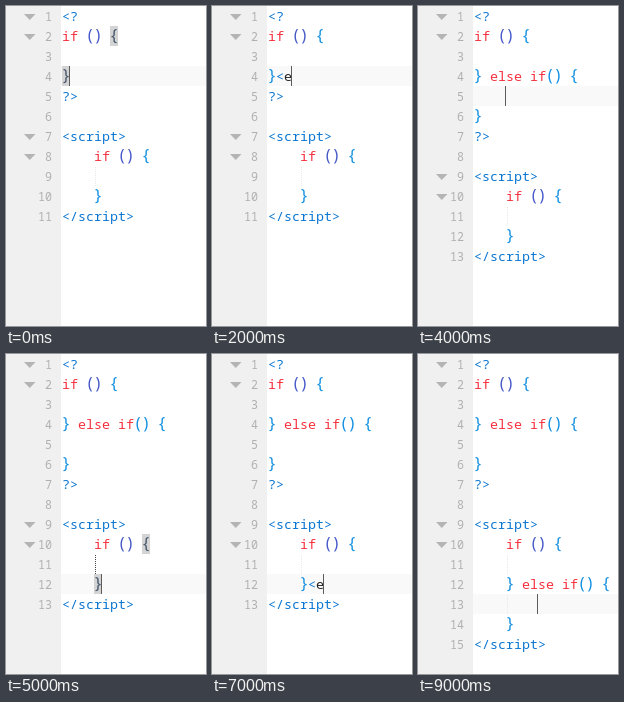
Animation, 200 px wide and 320 px high, one loop 10000 ms. Source, as an HTML page:

```html
<!DOCTYPE html>
<html lang="en">
<head>
<meta charset="utf-8">
<title>Code editor</title>
<style>
  html, body { margin: 0; width: 100%; height: 100%; overflow: hidden; background: #fff; }
  svg { display: block; width: 200px; height: 320px; }
  text { white-space: pre; font: 500 13.3333px "Noto Sans Mono", monospace; }
  .number { font-size: 11.7px; font-weight: 400; fill: #b0b0b0; text-anchor: end; }
  .fold { fill: #b4b4b4; }
  .bracket { font-size: 16px; font-weight: 400; text-anchor: middle; }
  .tag { fill: #0b76d1; }
  .keyword { fill: #f5303d; }
  .paren { fill: #4558c8; }
  .call, .brace { fill: #108fe0; }
  .plain { fill: #222; }
  .matchBrace { fill: #44566b; }
  .matchParen { fill: #7b4c43; }
</style>
</head>
<body>
<svg id="stage" viewBox="0 0 200 320"></svg>
<script>
const STEP = 1000, LEFT = 56, CHAR = 8, ROW = 20, BASELINE = 15;
const stage = document.getElementById("stage");
const TOKENS = /<\/?\w+>|<\?|\?>|<|else|if|[(){}]|\w+/g;

function add(parent, name, attrs, content = "") {
  const node = document.createElementNS("http://www.w3.org/2000/svg", name);
  for (const key in attrs) node.setAttribute(key, attrs[key]);
  node.textContent = content;
  return parent.appendChild(node);
}

const rect = (parent, x, y, width, height, fill) =>
  add(parent, "rect", { x, y, width, height, fill });

const columnX = column => LEFT + column * CHAR;
const rowY = row => (row - 1) * ROW;
const isBracket = token => /[(){}]/.test(token);

function tokenClass(token, line, matched) {
  if (/[{}]/.test(token)) return matched ? "matchBrace" : "brace";
  if (/[()]/.test(token)) return matched ? "matchParen" : line.includes("else") ? "call" : "paren";
  if (/^(if|else)$/.test(token)) return "keyword";
  return /[<>]/.test(token) ? "tag" : "plain";
}

const branch = ["} else if() {", "", "}"];
const indent = line => line && "    " + line;

// caret: [row, column]; matches: bracket cells [row, column]
function buildScene({ php, js, caret, matches = [], guideActive }) {
  const lines = ["<?", "if () {", "", ...php, "?>", "", "<script>",
    "    if () {", "", ...js.map(indent), "<\/script>"];
  const scriptRow = lines.indexOf("<script>") + 1;
  const group = add(stage, "g", { visibility: "hidden" });
  rect(group, 55, rowY(caret[0]), 145, ROW, "#f9f9f9");
  rect(group, 0, 0, 55, 320, "#f0f0f0");

  for (const [row, column] of matches)
    rect(group, columnX(column), rowY(row), CHAR, ROW, "#d4d4d4");

  lines.forEach((line, i) => {
    const row = i + 1, y = rowY(row);
    add(group, "text", { class: "number", x: 46, y: y + BASELINE }, row);
    if (row < 3 || row === scriptRow || row === scriptRow + 1)
      add(group, "path", { class: "fold", d: `M18 ${y + 8}h11.5l-5.75 6z` });
    if (!line && row > scriptRow)
      add(group, "path", {
        d: `M89.5 ${y + 1}v${ROW - 1}`, "stroke-dasharray": "1 1",
        stroke: guideActive ? "#444" : "#e8e8e8"
      });
    const text = add(group, "text", { y: y + BASELINE });
    for (const { 0: token, index } of line.matchAll(TOKENS)) {
      const matched = matches.some(([r, c]) => r === row && c === index);
      const bracket = isBracket(token);
      add(text, "tspan", {
        x: columnX(index) + (bracket ? CHAR / 2 : 0),
        class: tokenClass(token, line, matched) + (bracket ? " bracket" : "")
      }, token);
    }
  });

  rect(group, columnX(caret[1]) - 1, rowY(caret[0]), 1, ROW, "#5c5c5c");
  return group;
}

const scenes = [
  { php: ["}"], js: ["}"], caret: [4, 1], matches: [[2, 6], [4, 0]] },
  { php: ["}<"], js: ["}"], caret: [4, 2] },
  { php: ["}<e"], js: ["}"], caret: [4, 3] },
  { php: branch, js: ["}"], caret: [4, 10], matches: [[4, 9], [4, 10]] },
  { php: branch, js: ["}"], caret: [5, 4] },
  { php: branch, js: ["}"], caret: [12, 5], matches: [[10, 10], [12, 4]], guideActive: true },
  { php: branch, js: ["}<"], caret: [12, 6] },
  { php: branch, js: ["}<e"], caret: [12, 7] },
  { php: branch, js: branch, caret: [12, 14], matches: [[12, 13], [12, 14]] },
  { php: branch, js: branch, caret: [13, 8] }
].map(buildScene);

let shown;
function render() {
  const next = scenes[Math.floor(performance.now() / STEP) % scenes.length];
  if (next !== shown) {
    shown?.setAttribute("visibility", "hidden");
    next.setAttribute("visibility", "visible");
    shown = next;
  }
  requestAnimationFrame(render);
}
render();
</script>
</body>
</html>
```
